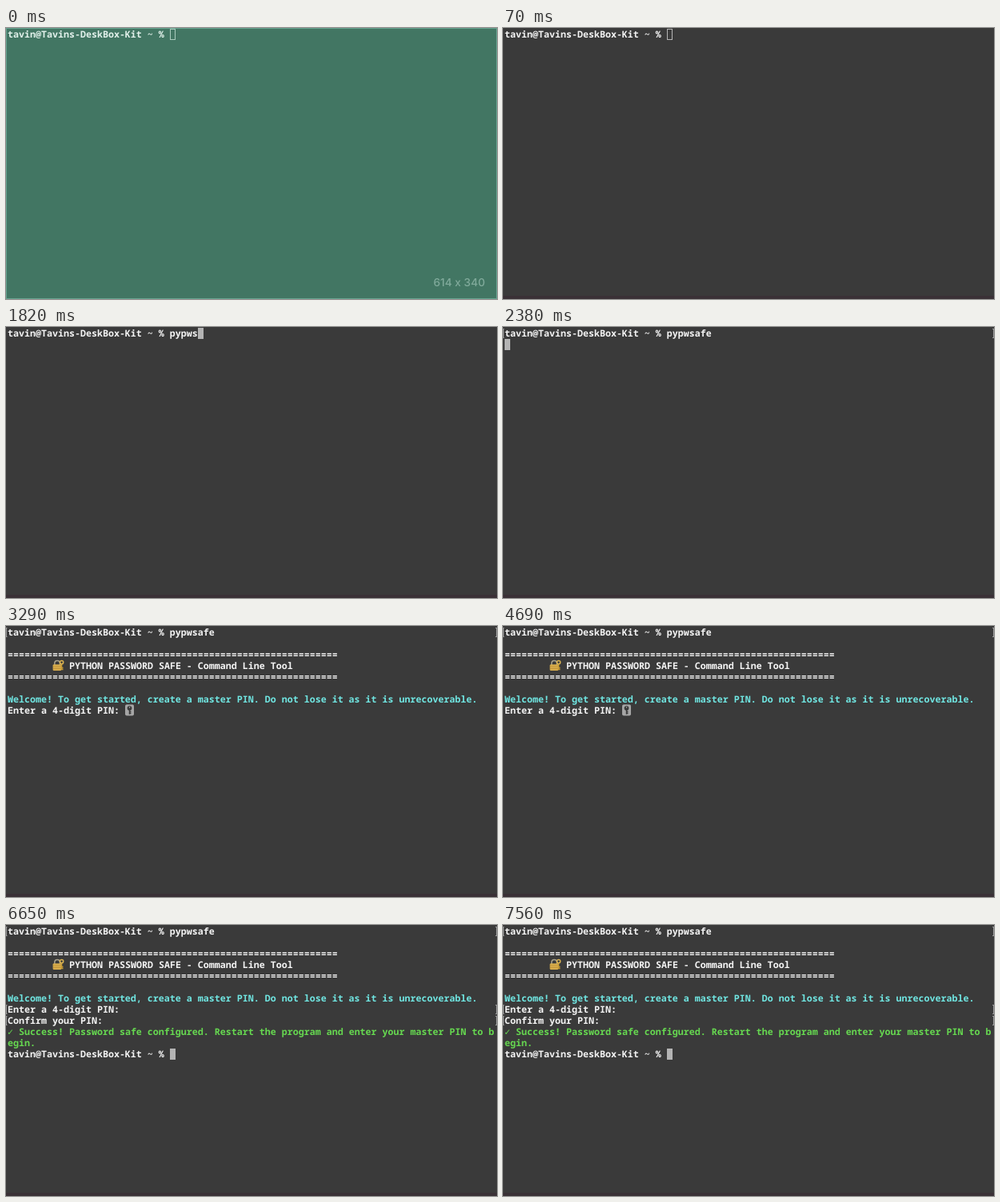
An HTML page for the animation above (8.47 s loop, 614 by 340 pixels).

```html
<!DOCTYPE html>
<html lang="en">
<head>
<meta charset="utf-8">
<title>Terminal session</title>
<style>
  html, body { margin: 0; width: 100%; height: 100%; overflow: hidden; background: #3a3a3a; }
  svg { display: block; width: 614px; height: 340px; }
  text {
    font: 600 11.667px "Noto Sans Mono", "DejaVu Sans Mono", monospace;
    font-variant-ligatures: none;
    white-space: pre;
    text-rendering: geometricPrecision;
  }
  .bold { font-weight: 700; }
  .size { font: 500 13.7px Inter, sans-serif; fill: #80aa9b; }
</style>
</head>
<body>
<svg id="stage" viewBox="0 0 614 340">
  <rect id="back" width="614" height="340"/>
  <rect id="strip" y="336" width="614" height="4" fill="#3a3136"/>
  <g id="screen"></g>
  <g id="lock">
    <path d="M60.8 49v-2.2a3.3 3.3 0 0 1 6.6 0v2.2" fill="none" stroke="#aaa28c" stroke-width="1.5"/>
    <rect x="58.6" y="48.3" width="10.6" height="7.7" rx="1.3" fill="#d8ad4c"/>
    <path d="M59 51h9.8M59 53.5h9.8" stroke="#b98a32" stroke-width=".7"/>
    <path d="M69.5 47v8.2M69.5 52.5h2M69.5 54.6h2" stroke="#c79c35" stroke-width="1.5"/>
    <circle cx="69.6" cy="45.6" r="2.1" fill="none" stroke="#dcb451" stroke-width="1.5"/>
  </g>
  <rect id="cursor" width="7" height="14"/>
  <g id="key">
    <rect width="11" height="14" rx="2" fill="#a6a6a6"/>
    <circle cx="5.5" cy="4.6" r="2.9" fill="#393939"/>
    <path d="M5.5 6v6.3M5.5 9h1.9M5.5 11h1.9" stroke="#393939" stroke-width="1.5"/>
    <circle cx="5.5" cy="3.6" r=".8" fill="#a6a6a6"/>
  </g>
  <g id="overlay">
    <rect x=".5" y=".5" width="613" height="339" fill="none" stroke="#66a38f"/>
    <text class="size" x="599" y="324" text-anchor="end">614 x 340</text>
  </g>
</svg>
<script>
const LOOP = 8470, CELL = 7, LINE = 14;
const NS = "http://www.w3.org/2000/svg";
const WHITE = "#f4f4f4", CYAN = "#70e6e2", GREEN = "#66d850";
const $ = id => document.getElementById(id);

const prompt = "tavin@Tavins-DeskBox-Kit ~ % ";
const command = "pypwsafe";
const typed = [1050, 1260, 1470, 1610, 1820, 1960, 2170, 2310];
const at = { focus: 70, run: 2380, banner: 2520, confirm: 4830, check: 6090, done: 6650 };

const colX = col => 2 + col * CELL;
const rowY = row => 1 + row * LINE;

function add(tag, attrs, text = "") {
  const el = document.createElementNS(NS, tag);
  for (const name in attrs) el.setAttribute(name, attrs[name]);
  el.textContent = text;
  $("screen").append(el);
  return el;
}

// Elements shown from a given time until the loop ends.
const timed = [];
function show(from, el) { timed.push({ from, el }); return el; }

function line(from, row, text, fill = WHITE, col = 0, cls = "") {
  return show(from, add("text", { x: colX(col), y: rowY(row) + 11, fill, class: cls }, text));
}

function marks(from, row) {
  const y = rowY(row) + 1.5;
  const d = `M0 ${y}h1.5M.5 ${y}v11M0 ${y + 11}h1.5M614 ${y}h-2M613.5 ${y}v11M614 ${y + 11}h-2`;
  show(from, add("path", { d, fill: "none", stroke: "#9a9a9a" }));
}

const first = line(0, 0, prompt);
const rule = "=".repeat(59);
line(at.banner, 2, rule, WHITE, 0, "bold");
line(at.banner, 3, "PYTHON PASSWORD SAFE - Command Line Tool", WHITE, 11, "bold");
line(at.banner, 4, rule, WHITE, 0, "bold");
line(at.banner, 6, "Welcome! To get started, create a master PIN. Do not lose it as it is unrecoverable.", CYAN);
line(at.banner, 7, "Enter a 4-digit PIN:");
line(at.confirm, 8, "Confirm your PIN:");
line(at.done, 9, "✓", GREEN);
line(at.done, 9, "Success! Password safe configured. Restart the program and enter your master PIN to b", GREEN, 2);
line(at.done, 10, "egin.", GREEN);
line(at.done, 11, prompt);
marks(at.run, 0);
marks(at.confirm, 7);
marks(at.check, 8);
show(at.banner, $("lock"));

function cursorAt(t, count) {
  if (t >= at.done) return { col: prompt.length, row: 11 };
  if (t >= at.check) return { col: 0, row: 9 };
  if (t >= at.confirm) return { col: 18, row: 8, secret: true };
  if (t >= at.banner) return { col: 21, row: 7, secret: true };
  if (t >= at.run) return { col: 0, row: 1 };
  return { col: prompt.length + count, row: 0, hollow: count === 0 };
}

function visible(el, on) { el.style.display = on ? "" : "none"; }

function render(t) {
  const tinted = t < at.focus;
  const count = typed.filter(time => t >= time).length;
  const { col, row, secret, hollow } = cursorAt(t, count);
  const x = colX(col), y = rowY(row);

  for (const item of timed) visible(item.el, t >= item.from);
  first.textContent = prompt + command.slice(0, count);
  first.setAttribute("fill", tinted ? "#e2f1eb" : WHITE);
  $("back").setAttribute("fill", tinted ? "#427663" : "#3a3a3a");
  visible($("strip"), !tinted);
  visible($("overlay"), tinted);

  const cursor = $("cursor"), inset = hollow ? 0.5 : 0;
  visible(cursor, !secret);
  visible($("key"), secret);
  cursor.setAttribute("x", x + inset);
  cursor.setAttribute("y", y + inset);
  cursor.setAttribute("width", CELL - 2 * inset);
  cursor.setAttribute("height", LINE - 2 * inset);
  cursor.setAttribute("fill", hollow ? "none" : "#b4b4b4");
  cursor.setAttribute("stroke", hollow ? (tinted ? "#a9cbbd" : "#b4b4b4") : "none");
  $("key").setAttribute("transform", `translate(${x} ${y - 0.5})`);
}

const start = performance.now();
function tick() {
  render((performance.now() - start) % LOOP);
  requestAnimationFrame(tick);
}
tick();
</script>
</body>
</html>
```
